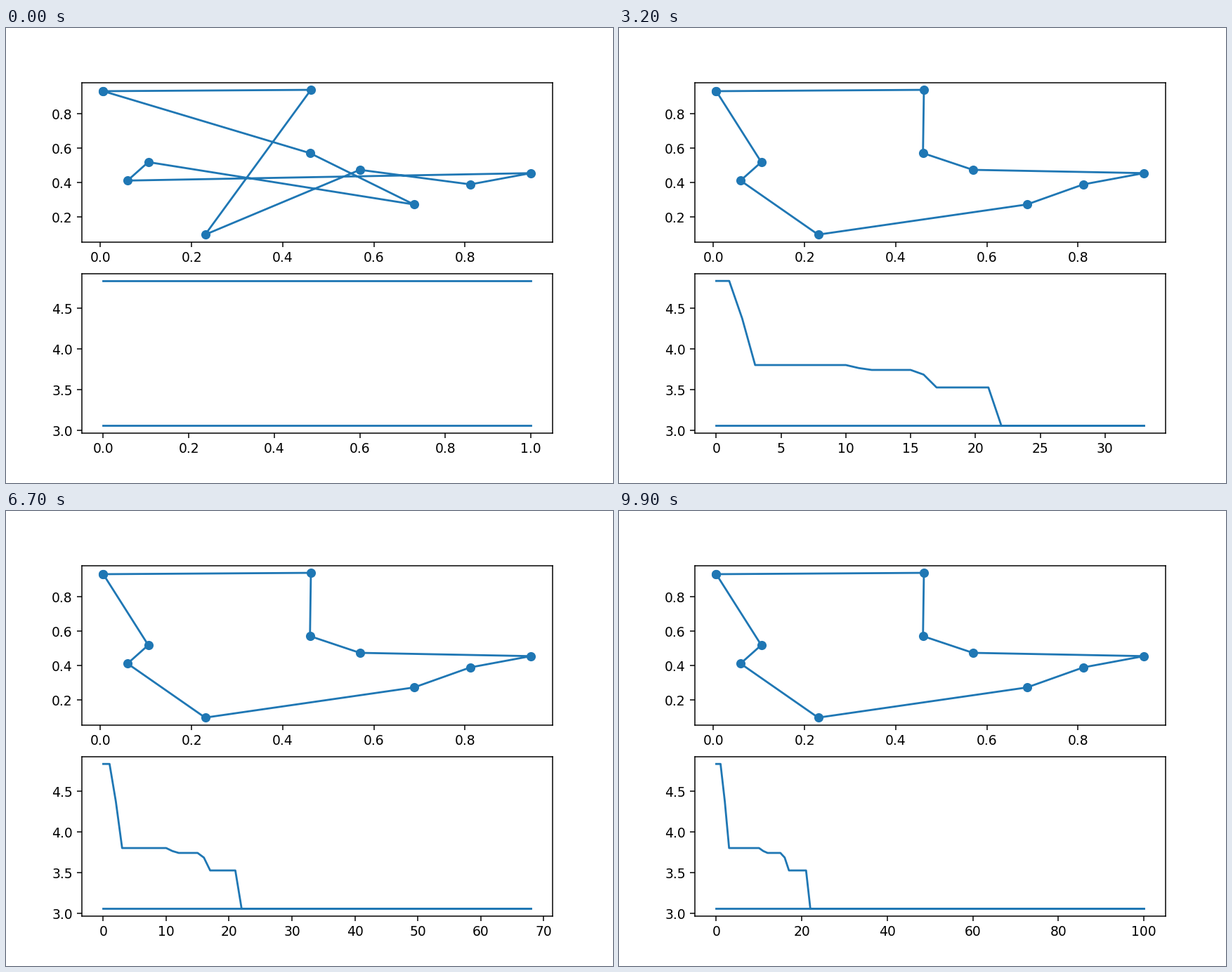
Recreate the animation shown at these times as a matplotlib script. Size 864x648 px, loop 10 s.

```python
import numpy as np
import matplotlib.pyplot as plt
from matplotlib.animation import FuncAnimation

FRAMES = 100

CITIES = {
    "A": (0.0061, 0.9320), "B": (0.4618, 0.9398), "C": (0.1049, 0.5199),
    "D": (0.0594, 0.4126), "E": (0.2298, 0.0986), "F": (0.5693, 0.4750),
    "G": (0.6880, 0.2738), "H": (0.8119, 0.3905), "I": (0.9447, 0.4558),
    "J": (0.4598, 0.5721),
}

# (first iteration, route, route length)
STAGES = [
    (0, "ABEFHIDCGJ", 4.835),
    (2, "ABCDIHFEGJ", 4.375),
    (3, "ABGIHFEDCJ", 3.803),
    (11, "ABHIFGEDCJ", 3.766),
    (12, "ABHIGFEDCJ", 3.743),
    (16, "ABIHFGEDCJ", 3.686),
    (17, "ABFIHGEDCJ", 3.528),
    (22, "ABJFIHGEDC", 3.0586),
]
BEST = STAGES[-1][2]


def stage_at(step):
    return [s for s in STAGES if s[0] <= step][-1]


def closed_path(route):
    return np.array([CITIES[c] for c in route + route[0]]).T


history = np.array([stage_at(i)[2] for i in range(FRAMES + 1)])

fig, (ax_map, ax_len) = plt.subplots(2, 1, figsize=(6.4, 4.8), dpi=135)
tour, = ax_map.plot(*closed_path(STAGES[0][1]), "o-", color="C0")
length, = ax_len.plot([], [], color="C0")
optimum, = ax_len.plot([], [], color="C0")


def update(frame):
    step = frame + 1
    x = np.arange(step + 1)
    tour.set_data(*closed_path(stage_at(step)[1]))
    length.set_data(x, history[:step + 1])
    optimum.set_data(x, np.full(step + 1, BEST))
    ax_len.relim()
    ax_len.autoscale_view()
    return tour, length, optimum


anim = FuncAnimation(fig, update, frames=FRAMES, interval=100,
                     repeat=True, repeat_delay=0, blit=False)
plt.show()
```
